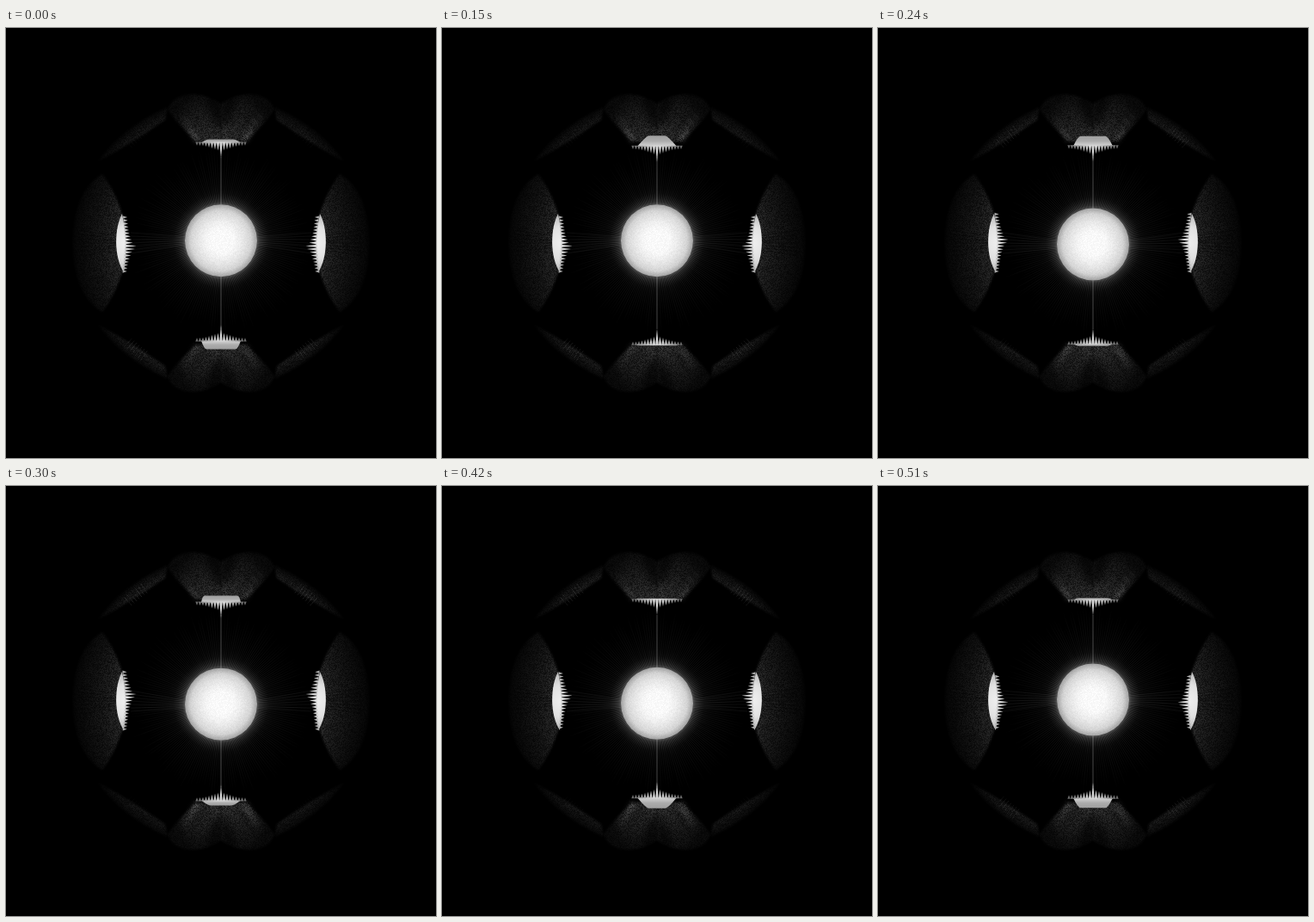
These frames come from a looping animation (500x500 px, 0.54 s). An HTML page with a canvas:

```html
<!DOCTYPE html>
<html>
<head>
<meta charset="utf-8">
<style>
html, body { margin: 0; width: 100%; height: 100%; overflow: hidden; background: #000; }
canvas { display: block; width: 500px; height: 500px; }
</style>
</head>
<body>
<canvas id="stage" width="500" height="500"></canvas>
<script>
const ctx = document.getElementById('stage').getContext('2d');
const STEPS = 18, STEP_MS = 30, TAU = Math.PI * 2, R = 42;

let seed = 7;
function random() {
  seed = (seed * 16807) % 2147483647;
  return seed / 2147483647;
}

function makeGrain() {
  const c = document.createElement('canvas');
  c.width = c.height = 500;
  const g = c.getContext('2d');
  const img = g.createImageData(500, 500);
  for (let i = 0; i < img.data.length; i += 4) {
    img.data.fill(80 + 175 * random(), i, i + 3);
    img.data[i + 3] = 255;
  }
  g.putImageData(img, 0, 0);
  return c;
}
const grain = makeGrain();

const gray = (v, a = 1) => `rgba(${v},${v},${v},${a})`;
const bell = (d, w) => Math.exp(-((d / w) ** 2));
const wave = (step, peak) => Math.cos((step - peak) / STEPS * TAU);

// Evenly spaced colours, inside to outside
function shade(gradient, colors) {
  colors.forEach((c, i) => gradient.addColorStop(i / (colors.length - 1), c));
  return gradient;
}
const radial = (x, y, r0, r1, ...colors) =>
  shade(ctx.createRadialGradient(x, y, r0, x, y, r1), colors);
const linear = (x1, y1, x2, y2, ...colors) =>
  shade(ctx.createLinearGradient(x1, y1, x2, y2), colors);

function soft(blur, draw) {
  ctx.save();
  ctx.filter = `blur(${blur}px)`;
  draw();
  ctx.restore();
}

function shape(path, fill) {
  ctx.fillStyle = fill;
  ctx.fill(new Path2D(path));
}

function line(x1, y1, x2, y2, color, width = 1) {
  ctx.strokeStyle = color;
  ctx.lineWidth = width;
  ctx.beginPath();
  ctx.moveTo(x1, y1);
  ctx.lineTo(x2, y2);
  ctx.stroke();
}

function flipped(sx, sy, draw) {
  ctx.save();
  ctx.translate(250, 250);
  ctx.scale(sx, sy);
  draw();
  ctx.restore();
}

// The lower half repeats the upper one, half a loop later
function halves(step, draw) {
  flipped(1, 1, () => draw(step));
  flipped(1, -1, () => draw(step + STEPS / 2));
}

function quarter(step) {
  const c = wave(step, 2.5);
  soft(1.2, () => {
    shape('M109 1 Q112 -45 138 -80 Q172 -60 172 1 Z',
      radial(0, 0, 108, 174, gray(62), gray(44), gray(28), gray(16), gray(4)));
    shape('M143 -95 Q102 -117 65 -143 L62 -158 Q115 -134 143 -95 Z',
      radial(0, 0, 148, 171, gray(38 - 9 * c), gray(26 - 5 * c), gray(6)));
    shape('M0 -113 L30 -119 Q46 -133 62 -155 Q56 -172 32 -173 Q14 -172 0 -162 Z',
      radial(0, -118, 8, 64, gray(58), gray(44), gray(30), gray(12)));
  });
  soft(5, () => shape('M-1 -135 L7 -138 Q24 -165 16 -175 L-1 -175 Z', gray(0, 0.65)));
  soft(2.5, () => line(27, -119, 47, -153,
    linear(27, -119, 47, -153, gray(170, 0.36 + 0.14 * c), gray(120, 0)), 7));
  for (let a = 0.82; a < 0.98; a += 0.025) {
    const x = Math.cos(a), y = -Math.sin(a);
    line(x * 152, y * 152, x * 165, y * 165, gray(120, 0.17 - 0.14 * c));
  }
}

function rays(cy) {
  for (let i = 0; i < 200; i++) {
    const a = (i + 0.5) / 200 * TAU;
    const dx = Math.cos(a), dy = Math.sin(a);
    const end = 90 + 20 * random();
    const from = [250 + dx * R, cy + dy * R], to = [250 + dx * end, cy + dy * end];
    line(...from, ...to,
      linear(...from, ...to, gray(255, 0.18), gray(255, 0.07), gray(255, 0.035), gray(255, 0)), 0.8);
  }
  line(250, 150, 250, cy - R, gray(255, 0.28));
  line(250, cy + R, 250, 350, gray(255, 0.28));
  for (const side of [-1, 1]) {
    for (let d = -3; d <= 3; d++) {
      line(250 + side * R, cy + d * 1.5, 250 + side * 105, 250 + d * 4, gray(255, 0.05));
      line(250 + side * 124, 250 + d * 3, 250 + side * 165, 250 + d * 5, gray(0, 0.3));
    }
  }
}

function tooth(x, y, dx, dy, half) {
  ctx.beginPath();
  ctx.moveTo(x - (dx ? 0 : half), y - (dx ? half : 0));
  ctx.lineTo(x + dx, y + dy);
  ctx.lineTo(x + (dx ? 0 : half), y + (dx ? half : 0));
  ctx.fill();
}

function pole(step) {
  const rise = wave(step, 6);
  const base = -115 + 3 * rise, edge = -122 - 3 * rise;
  const half = 15.5 - 6.5 * wave(step, 4);
  shape(`M-23 ${base} Q${-half - 3} ${edge} ${-half} ${edge} H${half} Q${half + 3} ${edge} 23 ${base} Z`,
    linear(0, base, 0, edge, gray(215), gray(172), gray(158)));
  for (let x = -28; x <= 28; x += 3.5) {
    ctx.fillStyle = gray(70 + 145 * bell(x, 24));
    tooth(x, base - 1, 0, 4 + 6 * bell(x, 15) + 9 * bell(x, 2), 1.7);
  }
}

function lens(spike) {
  shape('M115 -34 C124 -18 125 16 113 34 Q107 0 115 -34 Z',
    radial(110, 0, 2, 36, gray(238), gray(225), gray(180)));
  for (let y = -31 + spike % 3.7; y < 34; y += 3.7) {
    const d = y - spike;
    ctx.fillStyle = gray(225 - 60 * Math.abs(y) / 34);
    tooth(112 + y * y / 460, y, -5 - 5 * bell(d, 13) - 5 * bell(d, 2.5), 0, 1.7);
  }
}

function orb(cy) {
  ctx.save();
  ctx.fillStyle = radial(250, cy, 40, 55, gray(255, 0.3), gray(255, 0.09), gray(255, 0.03), gray(255, 0));
  ctx.fillRect(190, cy - 60, 120, 120);
  ctx.beginPath();
  ctx.arc(250, cy, R, 0, TAU);
  ctx.fillStyle = radial(250, cy, 8, R, gray(255), gray(253), gray(244), gray(232), gray(216), gray(165));
  ctx.fill();
  ctx.clip();
  ctx.globalCompositeOperation = 'multiply';
  ctx.globalAlpha = 0.07;
  ctx.drawImage(grain, 0, 0);
  ctx.restore();
}

function render(step) {
  const c = wave(step, 2.5);
  const cy = 250 - 4.2 * c;
  seed = 7;

  ctx.fillStyle = '#000';
  ctx.fillRect(0, 0, 500, 500);
  for (const side of [-1, 1]) {
    flipped(side, 1, () => quarter(step));
    flipped(side, -1, () => quarter(step + STEPS / 2));
  }
  ctx.globalCompositeOperation = 'multiply';
  ctx.drawImage(grain, 0, 0);
  ctx.globalCompositeOperation = 'source-over';

  rays(cy);
  halves(step, pole);
  for (const side of [-1, 1]) flipped(side, 1, () => lens(7.5 * c));
  orb(cy);
}

let shown = -1;
const start = performance.now();
function tick(now) {
  const step = Math.floor(Math.max(0, now - start) / STEP_MS) % STEPS;
  if (step !== shown) render(shown = step);
  requestAnimationFrame(tick);
}
tick(start);
</script>
</body>
</html>
```
